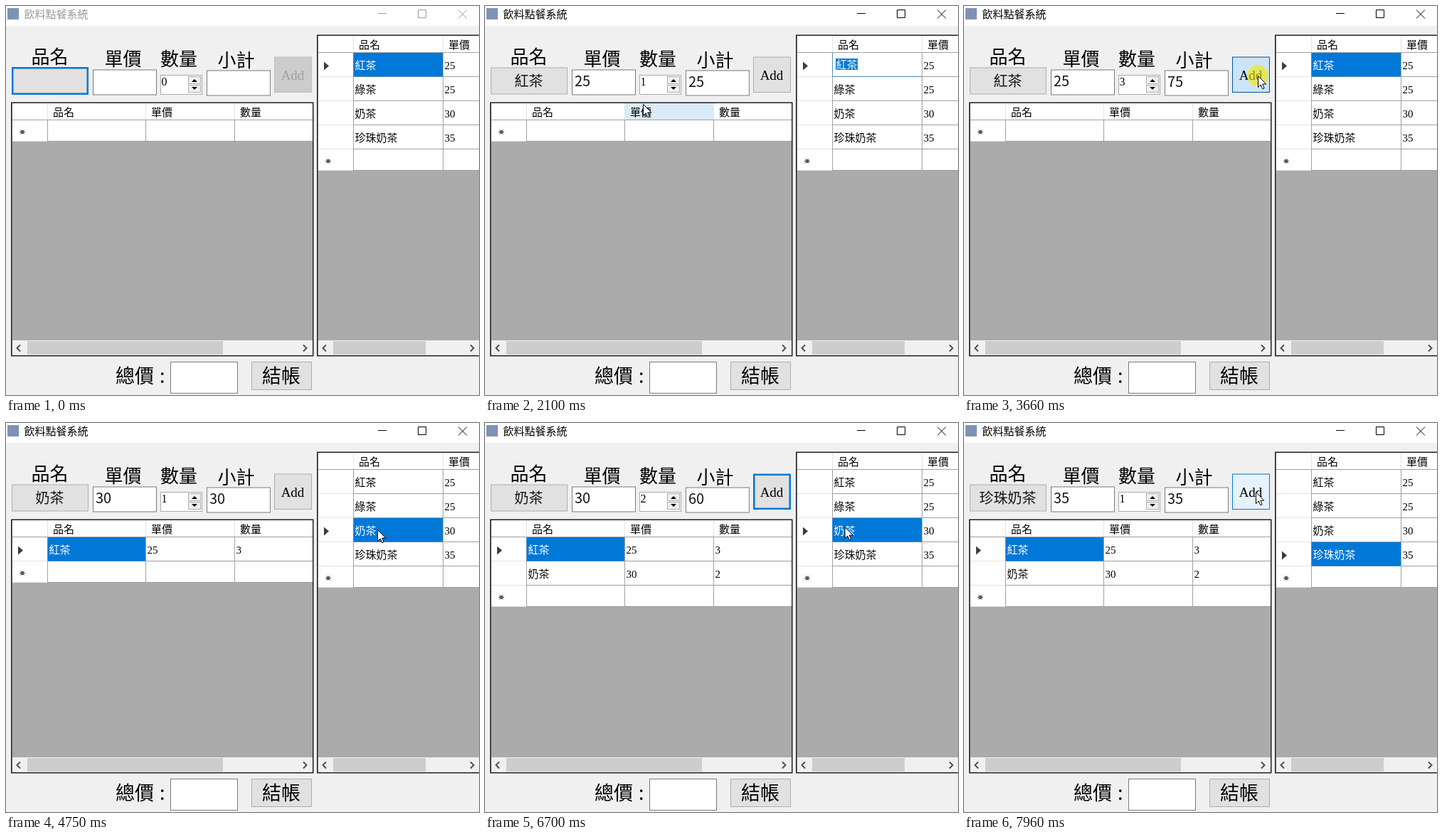
These frames come from a looping animation (665x548 px, 8000 ms). An HTML page:

```html
<!DOCTYPE html>
<html lang="zh-Hant">
<head>
<meta charset="utf-8">
<style>
html, body { margin: 0; width: 100%; height: 100%; overflow: hidden; background: #f0f0f0; }
svg { display: block; }
text { font-family: "Noto Sans CJK TC", "Noto Sans CJK", "Noto Sans", sans-serif; white-space: pre; }
.s { font-family: "Liberation Serif", "Noto Sans CJK TC", "Noto Sans CJK", serif; }
.l { font-weight: 300; }
</style>
</head>
<body>
<svg id="stage" width="665" height="548" viewBox="0 0 665 548"></svg>
<script>
const LOOP = 8000, START = 400, TICK = 77.6;
const BLUE = '#0078d7', LINE = '#a0a0a0', PALE = '#e3e3e3', FACE = '#e1e1e1', EDGE = '#7a7a7a';
const stage = document.getElementById('stage');
const drinks = [['紅茶', 25], ['綠茶', 25], ['奶茶', 30], ['珍珠奶茶', 35]];

// Pointer stops: arrive and leave (ticks), place
const stops = [
  [0, 0, 575, 528], [8, 18, 535, 89], [22, 23, 222, 138], [29, 35, 265, 102],
  [41, 44, 413, 98], [50, 55, 535, 150], [56, 56, 522, 150], [66, 67, 268, 102],
  [69, 70, 273, 102], [76, 77, 410, 99], [81, 82, 505.5, 146], [86, 90, 556, 187], [97, 99, 410, 97]
];
// Clicks: press and release (ticks), action, menu row
const clicks = [
  [11, 18, 'pick', 0], [30, 30, 'more'], [34, 34, 'more'], [42, 43, 'add'],
  [53, 55, 'pick', 2], [67, 68, 'more'], [76, 77, 'add'], [88, 89, 'pick', 3]
];

function pointer(k) {
  if (k < 0) return null;
  const i = stops.findIndex(s => k <= s[1]);
  const [arrive, , x, y] = stops[i];
  if (k >= arrive) return [x, y];
  const [, leave, px, py] = stops[i - 1];
  const f = (k - leave) / (arrive - leave), e = f * f * (3 - 2 * f);
  return [px + (x - px) * e, py + (y - py) * e];
}

// Replays the clicks up to tick k
function stateAt(k) {
  const st = { mark: 0, drink: null, qty: 0, orders: [], focus: 'name', edit: false, down: false, caret: false };
  for (const [press, release, act, row] of clicks) {
    if (k < press) break;
    st.down = k <= release;
    if (act === 'pick') {
      st.edit = !st.drink && k >= press + 2;
      st.mark = row;
      st.focus = '';
      if (k > press) { st.drink = drinks[row]; st.qty = 1; }
    } else if (act === 'more') {
      st.qty++;
      st.edit = false;
      st.caret = k < press + 4;
    } else if (k > release) {
      st.orders.push([...st.drink, st.qty]);
      st.focus = 'add';
    }
  }
  return st;
}

const fill = (x, y, w, h, c) => `<rect x="${x}" y="${y}" width="${w}" height="${h}" fill="${c}"/>`;
const box = (x, y, w, h, c, edge, lw = 1) => {
  const o = lw / 2;
  return `<rect x="${x + o}" y="${y + o}" width="${w - lw}" height="${h - lw}" fill="${c}" stroke="${edge}" stroke-width="${lw}"/>`;
};
const shape = (d, c = '#000') => `<path d="${d}" fill="${c}"/>`;
const stroke = (d, c, lw = 1) => `<path d="${d}" fill="none" stroke="${c}" stroke-width="${lw}"/>`;
const label = (x, y, size, s, c = '#000', cls = '', anchor = 'start') =>
  `<text x="${x}" y="${y}" font-size="${size}" fill="${c}" class="${cls}" text-anchor="${anchor}">${s}</text>`;
const cellText = (x, y, s, c) => label(x, y, 15, s, c, 's');

function titleBar(active) {
  const c = active ? '#000' : '#999';
  return fill(0, 0, 665, 28, '#fff') + fill(2, 3, 16, 16, '#7d93b5') +
    label(25.5, 17, 15, '飲料點餐系統', c, 'l') +
    stroke('M523 10.5h12M579.5 5.5h11v11h-11zM636 5.5l12 12M648 5.5l-12 12', c);
}

function scrollBar(x, w, thumb, len, right) {
  return fill(x, 471, w, 21, '#f0f0f0') + fill(thumb, 472, len, 19, '#cdcdcd') +
    stroke(`M${x + 11} 477.5l-4.5 4.5l4.5 4.5M${right} 477.5l4.5 4.5l-4.5 4.5`, '#505050', 2);
}

const rowArrow = (x, y) => shape(`M${x} ${y - 6}l7 6l-7 6z`, '#3c3c3c');
const newMark = (x, y) => `<circle cx="${x}" cy="${y}" r="2.6" fill="#444"/>` +
  stroke(`M${x - 4} ${y}h8M${x - 2.5} ${y - 3.2}l5 6.4M${x + 2.5} ${y - 3.2}l-5 6.4`, '#666');

// Header, filled rows and one empty row
function table(x, cols, end, top, names, rows, mark, hot) {
  let y = top + 24;
  let s = fill(x, top, end - x, 24, '#fff');
  if (hot) s += fill(cols[1] + 1, top, cols[2] - cols[1] - 1, 23, '#d9ebf9');
  s += stroke(cols.map(c => `M${c + .5} ${top}v23`).join(''), PALE) +
    stroke(`M${x} ${y - .5}H${end}`, LINE);
  names.forEach((n, j) => s += cellText(cols[j] + 8, top + 17.7, n));

  [...rows, null].forEach((row, i) => {
    const h = row ? 34 : 30, on = row && i === mark;
    s += fill(x, y, end - x, h, '#fff') +
      stroke(`M${x} ${y + h - .5}H${cols[0]}`, PALE) +
      stroke(`M${cols[0]} ${y + h - .5}H${end}` + cols.map(c => `M${c + .5} ${y}v${h}`).join(''), LINE);
    if (on) s += fill(cols[0] + .5, y, cols[1] - cols[0] - .5, h - .5, BLUE) + rowArrow(x + 8, y + 18.5);
    if (row) row.forEach((v, j) => s += cellText(cols[j] + 2.5, y + 22.5, v, on && !j ? '#fff' : '#000'));
    else s += newMark(x + 14, y + 16.5);
    y += h;
  });
  return s;
}

function orderGrid(orders, hot) {
  return box(7, 135.5, 425.5, 358, '#ababab', '#222', 1.5) +
    table(9, [58, 196, 321], 431, 137, ['品名', '單價', '數量'], orders, 0, hot) +
    scrollBar(9, 422, 30, 275, 418);
}

function menuGrid(mark, editing) {
  let s = box(437, 40.5, 240, 453, '#ababab', '#222', 1.5) +
    table(439, [488, 614], 665, 42, ['品名', '單價'], drinks, mark);
  if (editing) s += fill(489, 66, 125, 33, '#fff') + fill(493, 74, 31, 16, BLUE) +
    cellText(493.5, 88, drinks[mark][0], '#fff');
  return s + scrollBar(439, 226, 460, 130, 653);
}

function spinner(value, hot, caret) {
  return box(217, 97, 59, 28, '#fff', '#ababab') +
    (hot ? box(256, 99, 18, 11, '#cce4f7', '#7eb4ea') : box(256, 99, 18, 11, '#f0f0f0', '#acacac')) +
    box(256, 111, 18, 11, '#f0f0f0', '#acacac') +
    shape('M261 107h8l-4-4zM261 114h8l-4 4z') +
    label(218.5, 112, 16, value, '#000', 's') +
    (caret ? stroke('M219.5 99v13', '#000') : '');
}

function addButton(ready, focus, hot, down) {
  const look = !ready ? ['#ccc', '#bfbfbf'] : hot && down ? ['#cce4f7', '#005499'] :
    hot ? ['#e5f1fb', BLUE] : focus ? [FACE, BLUE, 2.5] : [FACE, '#adadad'];
  return box(377, 71.5, 53, 50.5, ...look) +
    label(403, 104, 19, 'Add', ready ? '#000' : '#a0a0a0', 's', 'middle');
}

function render(k) {
  const tip = pointer(k), st = stateAt(k), drink = st.drink;
  const over = (x, y, w, h) => tip && tip[0] >= x && tip[0] <= x + w && tip[1] >= y && tip[1] <= y + h;

  let s = fill(0, 0, 665, 548, '#f0f0f0') + titleBar(k >= clicks[0][0]);
  s += label(35.5, 81, 26, '品名', '#000', 'l') + label(138.5, 83.5, 26, '單價', '#000', 'l') +
    label(217, 83.5, 26, '數量', '#000', 'l') + label(297.5, 85.5, 26, '小計', '#000', 'l');
  s += st.focus === 'name' ? box(8, 86, 108, 39, FACE, BLUE, 2.5) : box(8, 86.5, 108, 38, FACE, '#adadad');
  s += box(122, 89.5, 90, 36, '#fff', EDGE) + box(282, 90.5, 90, 36, '#fff', EDGE);
  if (drink) s += label(61.5, 113, 20, drink[0], '#111', 'l', 'middle') +
    label(126, 113, 20, drink[1], '#111', 'l') + label(286, 114, 20, drink[1] * st.qty, '#111', 'l');
  s += spinner(st.qty, over(256, 98, 18, 12), st.caret);
  s += addButton(drink, st.focus === 'add', over(377, 72, 53, 50), st.down);
  s += orderGrid(st.orders, over(197, 137, 124, 24));
  s += menuGrid(st.mark, st.edit);
  s += label(154, 530.5, 27, '總價', '#000', 'l') + label(216, 530.5, 27, ':', '#000', 'l') +
    box(231, 501, 95, 45, '#fff', EDGE) + box(345, 501, 85, 40, FACE, '#adadad') +
    label(387, 531, 27, '結帳', '#000', 'l', 'middle');

  if (tip) {
    const [x, y] = tip;
    if (st.down) s += `<circle cx="${x}" cy="${y}" r="15" fill="#f0e800" opacity=".62"/>`;
    s += `<path transform="translate(${x} ${y})" d="M.5 .5V16.5L4.2 13L6.8 18.8L9.2 17.8L6.7 12.1H11.8Z" fill="#fff" stroke="#000"/>`;
  }
  stage.innerHTML = s;
}

const origin = performance.now();
let shown = null;
function frame(now) {
  const t = Math.max(0, now - origin) % LOOP;
  const k = t < START ? -1 : Math.floor((t - START + 12) / TICK);
  if (k !== shown) render(shown = k);
  requestAnimationFrame(frame);
}
frame(origin);
</script>
</body>
</html>
```
